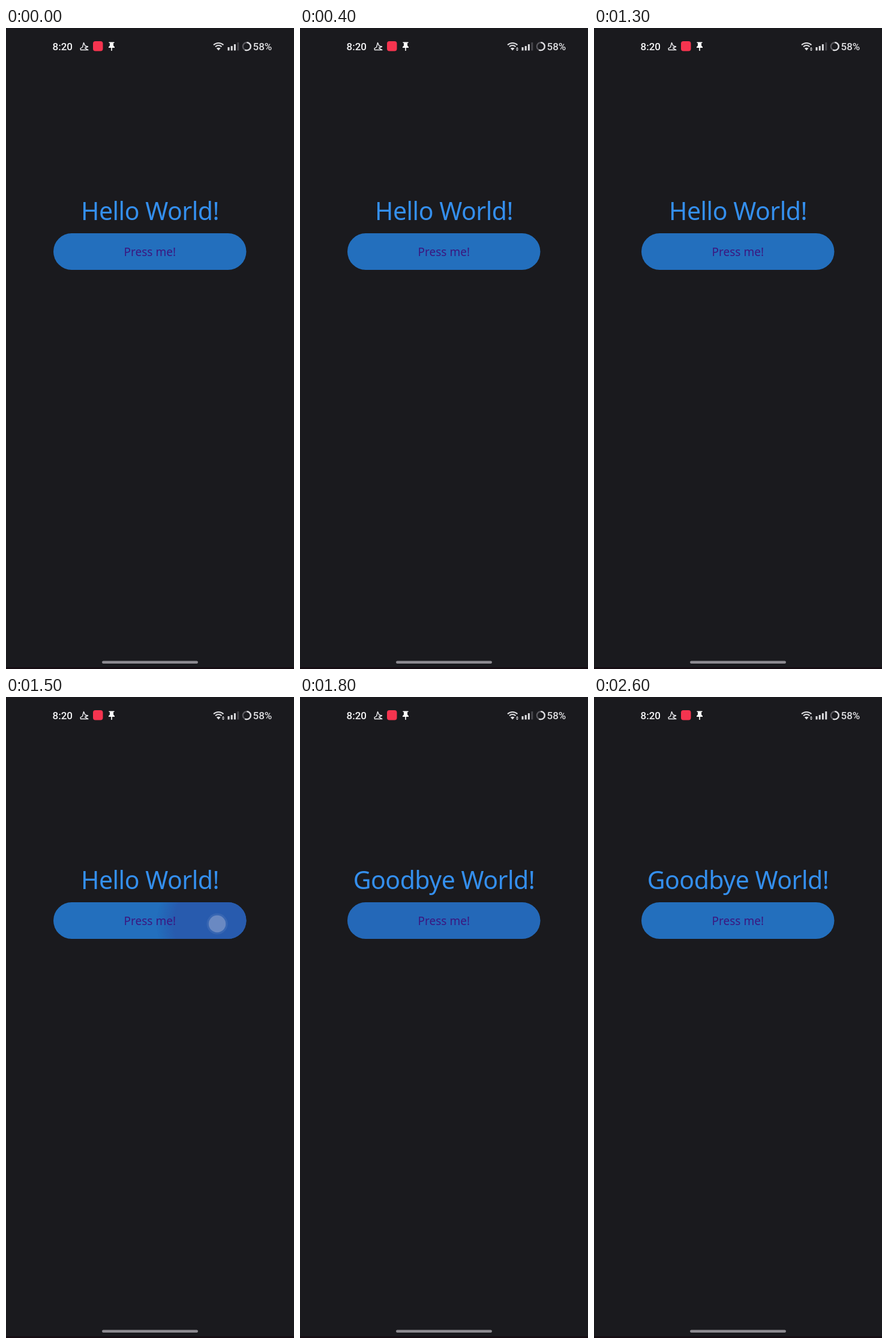
Recreate the animation shown at these times as an HTML page. Size 480 px wide and 1068 px high, loop 2.7 s.

```html
<!DOCTYPE html>
<html lang="en">
<head>
<meta charset="utf-8">
<title>Hello World</title>
<style>
  html, body { margin: 0; width: 100%; height: 100%; overflow: hidden; background: #1a1a1e; }
  svg { display: block; width: 100%; height: 100%; }
  text { font-family: "Noto Sans", sans-serif; text-anchor: middle; }
  .status { font: 500 17px Roboto, sans-serif; text-anchor: start; }
  .title { font-size: 41px; letter-spacing: -.5px; fill: #348fee; }
  .label { font-size: 19px; fill: #3b1780; }
  .line { fill: none; stroke: #dedee1; stroke-width: 2; }

  .hello, .goodbye, .arrows, .last-bar, .ripple, .touch {
    animation: 2700ms step-end infinite;
  }
  .hello { animation-name: leave; }
  .goodbye { animation-name: enter; }
  .arrows { animation-name: data; }
  .last-bar { animation-name: signal; }
  .touch { animation-name: touch; }
  .ripple { animation-name: ripple; transform-origin: 352px 378px; }

  @keyframes leave { 0% { opacity: 1 } 59.2%, 100% { opacity: 0 } }
  @keyframes enter { 0% { opacity: 0 } 59.2%, 100% { opacity: 1 } }
  @keyframes data { 0% { opacity: 0 } 3.7%, 100% { opacity: 1 } }
  @keyframes signal { 0% { fill: #47464c } 70.3%, 100% { fill: #dedee1 } }
  @keyframes touch {
    0% { opacity: 0 }
    55.5% { opacity: 1 }
    62.9%, 100% { opacity: 0 }
  }
  @keyframes ripple {
    0% { opacity: 0; transform: scale(.1) }
    55.5% { opacity: .8; transform: scale(.45) }
    59.2% { opacity: 1; transform: scale(1) }
    62.9% { opacity: .75; transform: scale(1.55) }
    66.6% { opacity: .25; transform: scale(1.8) }
    70.3%, 100% { opacity: 0; transform: scale(1.8) }
  }
</style>
</head>
<body>
<svg viewBox="0 0 480 1068" preserveAspectRatio="none">
  <defs>
    <radialGradient id="wave">
      <stop offset=".72" stop-color="#2a57ab"/>
      <stop offset="1" stop-color="#2a57ab" stop-opacity="0"/>
    </radialGradient>
    <clipPath id="pill"><rect x="79" y="342" width="321.5" height="61" rx="30.5"/></clipPath>
  </defs>
  <rect width="480" height="1068" fill="#1a1a1e"/>
  <rect y="1065" width="480" height="3" fill="#160e14"/>

  <!-- Status bar, left -->
  <text class="status" x="77.5" y="37" fill="#f4f4f6">8:20</text>
  <path d="M129.5 24.5 132 30 136.5 31 131.5 33.5 137 36.5H124.5L124 34 127.5 32Z"
        fill="none" stroke="#ededf0" stroke-width="1.4" stroke-linejoin="round"/>
  <rect x="145" y="22" width="16.5" height="16.5" rx="4" fill="#f5344f"/>
  <path d="M171.5 23.5H180.5V25H179V29.5L181 31.5V33H176.8V38H175.2V33H171V31.5L173 29.5V25H171.5Z" fill="#fff"/>

  <!-- Status bar, right -->
  <path class="line" d="M346 28.2A12 12 0 0 1 362.4 28.2M349 31.2A7.5 7.5 0 0 1 359.4 31.2"/>
  <path d="M350.8 33.8Q354.2 31.5 357.6 33.8L354.2 37.6Z" fill="#dedee1"/>
  <path class="arrows" d="M359.8 34.5 362 32 364.2 34.5ZM359.8 35.7H364.2L362 38.2Z" fill="#dedee1"/>
  <g fill="#dedee1">
    <rect x="369.5" y="32" width="3" height="5.5" rx=".6"/>
    <rect x="374.7" y="30" width="3" height="7.5" rx=".6"/>
    <rect x="379.9" y="27" width="3" height="10.5" rx=".6"/>
    <rect class="last-bar" x="385.3" y="24" width="3" height="13.5" rx=".6"/>
  </g>
  <g fill="none" stroke-width="2.3" transform="rotate(-90 401.3 30.7)">
    <circle cx="401.3" cy="30.7" r="6.5" stroke="#5a595f"/>
    <circle cx="401.3" cy="30.7" r="6.5" stroke="#dedee1" pathLength="100" stroke-dasharray="58 42"/>
  </g>
  <text class="status" x="411.5" y="37" fill="#dedee1">58%</text>

  <text class="title hello" x="240" y="320">Hello World!</text>
  <text class="title goodbye" x="240" y="320">Goodbye World!</text>

  <g clip-path="url(#pill)">
    <rect x="79" y="342" width="322" height="61" fill="#236fbd"/>
    <circle class="ripple" cx="352" cy="378" r="225" fill="url(#wave)"/>
  </g>
  <text class="label" x="239.8" y="380">Press me!</text>
  <g class="touch">
    <circle cx="352" cy="378" r="17.5" fill="#8aa5d0" opacity=".15"/>
    <circle cx="352" cy="378" r="14.2" fill="#6a89c2"/>
  </g>

  <rect x="160" y="1054.5" width="160" height="4.5" rx="2.2" fill="#8d8b91"/>
</svg>
</body>
</html>
```
